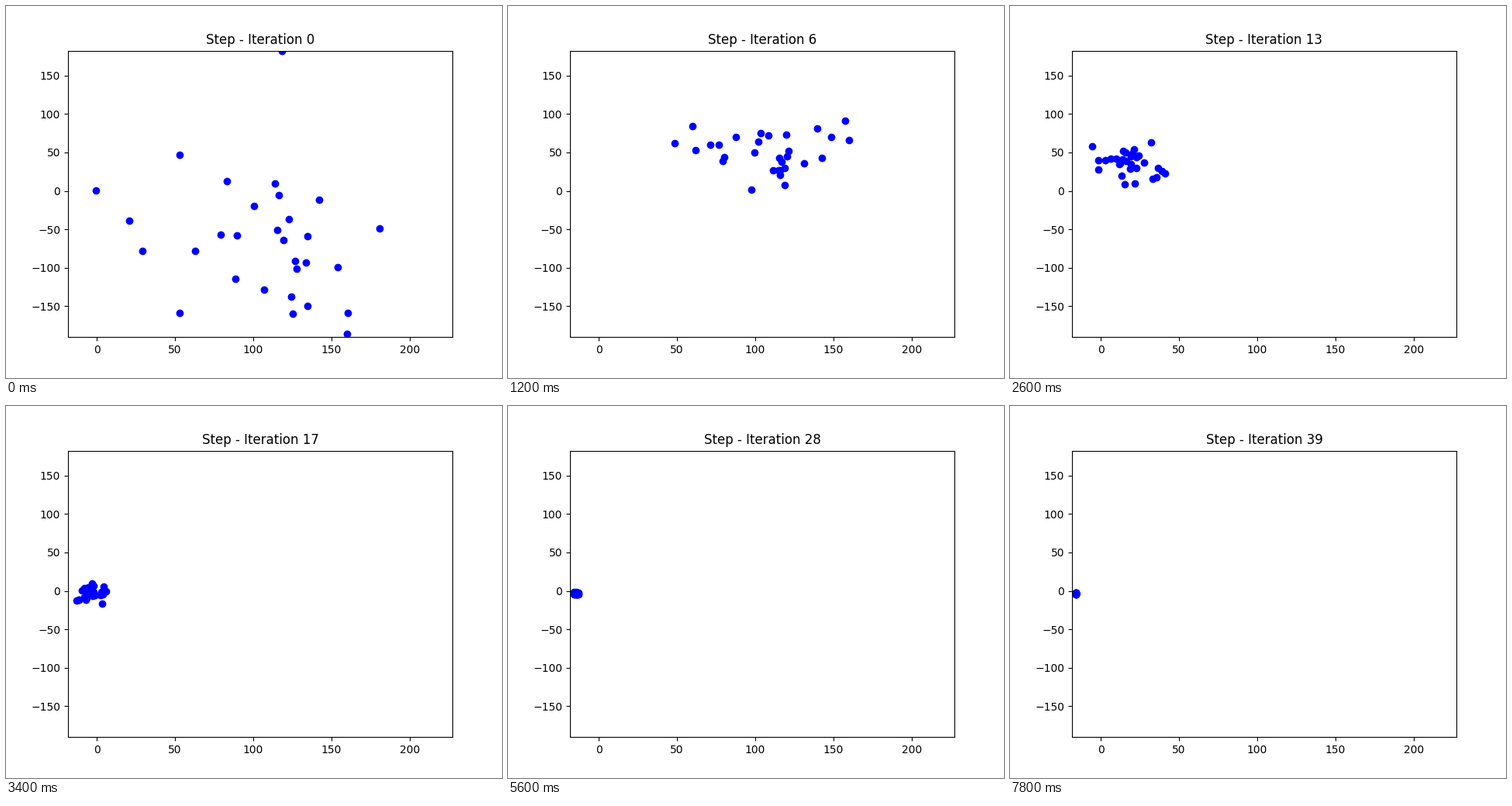
Recreate the animation shown at these times as a matplotlib script. Size 640 by 480 pixels, loop 8000 ms.

```python
import numpy as np
import matplotlib.pyplot as plt
from matplotlib.animation import FuncAnimation

W, H, DPI = 640, 480, 100
FRAMES, INTERVAL = 40, 200
WALL = 84.5  # the swarm never gets further left
rng = np.random.default_rng(7)


def by_x(points):
    return points[np.argsort(points[:, 0])]


def cloud(center, spread):
    """Seeded scatter of the whole swarm around a stage position."""
    unit = rng.normal(0, 1, start.shape)
    unit = np.clip((unit - unit.mean(axis=0)) / unit.std(axis=0), -2.1, 2.1)
    points = by_x(np.array(center) + unit * spread)
    points[:, 0] = np.maximum(points[:, 0], WALL)
    return points


# Where the particles are released, in stage pixels
start = by_x(np.array([
    (356, 58), (224, 192), (285, 226), (347, 229), (352, 244), (404, 250),
    (116, 238), (320, 258), (159, 277), (365, 275), (482, 287), (277, 295),
    (298, 296), (350, 289), (358, 302), (389, 297), (176, 316), (244, 316),
    (373, 329), (387, 331), (375, 339), (428, 337), (296, 352), (333, 366),
    (368, 375), (389, 387), (224, 396), (370, 397), (441, 396), (440, 423),
], float))

# The swarm climbs, drifts left, then closes in on the optimum
times = np.array([0, 6, 10, 17, 23, 33, 39])
keys = np.array([
    start,
    cloud((335, 189), (57, 23)),
    cloud((209, 176), (39, 20)),
    cloud((110, 242), (10, 6)),
    cloud((92, 242), (4, 1.6)),
    cloud((85.5, 242), (0.4, 0.4)),
    cloud((84.5, 242), (0.2, 0.5)),
])

# Monotone tangents: no overshoot, at rest at both ends
slopes = np.diff(keys, axis=0) / np.diff(times)[:, None, None]
a, b = slopes[:-1], slopes[1:]
same = a * b > 0
tangents = np.zeros_like(keys)
tangents[1:-1] = np.where(same, 2 * a * b / np.where(same, a + b, 1), 0)


def positions(frame):
    k = min(np.searchsorted(times, frame, side="right") - 1, len(times) - 2)
    span = times[k + 1] - times[k]
    u = (frame - times[k]) / span
    ease = u * u * (3 - 2 * u)
    return (keys[k] * (1 - ease) + keys[k + 1] * ease
            + span * u * (1 - u) ** 2 * tangents[k]
            - span * u * u * (1 - u) * tangents[k + 1])


fig, ax = plt.subplots(figsize=(W / DPI, H / DPI), dpi=DPI)
dots = ax.scatter([], [], c="b")
ax.set_xlim(-18.5, 227.4)
ax.set_ylim(-190.2, 182.5)
title = ax.set_title("")
to_data = ax.transData.inverted()


def update(frame):
    x, y = positions(frame).T
    dots.set_offsets(to_data.transform(np.column_stack([x, H - y])))
    title.set_text(f"Step - Iteration {frame}")
    return dots, title


anim = FuncAnimation(fig, update, frames=FRAMES, interval=INTERVAL,
                     repeat=True, repeat_delay=0)
plt.show()
```
